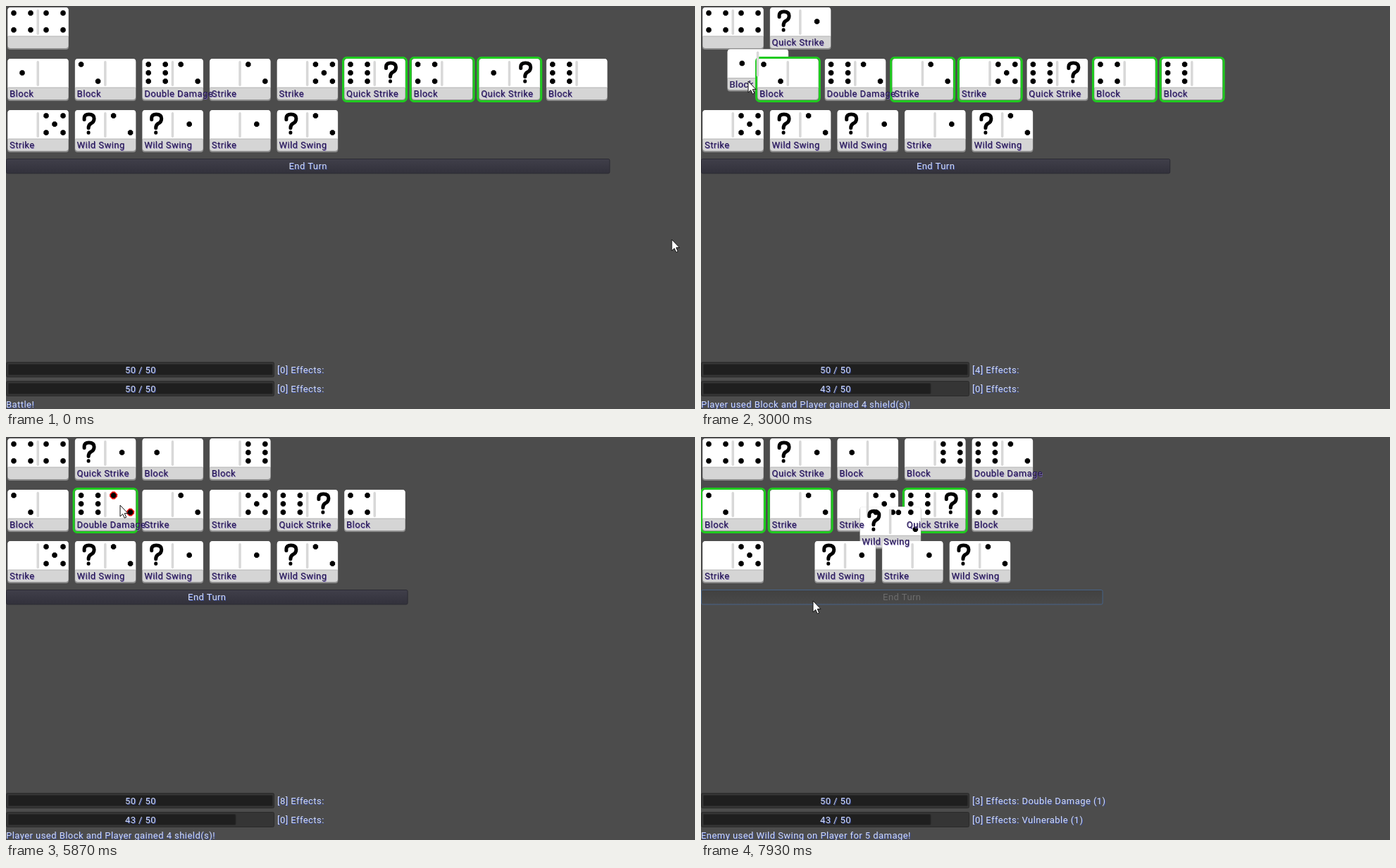
Write an HTML page that moves like this. It is 978 px wide and 573 px high and loops after 8 s.

```html
<!DOCTYPE html>
<html lang="en">
<head>
<meta charset="utf-8">
<title>Domino battle</title>
<style>
  html, body { margin: 0; width: 100%; height: 100%; overflow: hidden; background: #4c4c4c; }
  svg { display: block; width: 978px; height: 573px; cursor: none; }
  text {
    font: 13px Roboto, "Open Sans", sans-serif;
    letter-spacing: .45px;
    fill: #d3dcf4;
    text-shadow: 1px 1px 0 #3a4c9c;
    white-space: pre;
  }
  .label { fill: #24184e; text-shadow: .7px .7px 0 #7a66b4; }
  .mid { text-anchor: middle; }
  .glow { display: none; }
  .hot .glow { display: inline; }
  .ring { display: none; fill: none; stroke: #1fcb1f; stroke-width: 3; }
  .on .ring { display: inline; }
  #button rect { fill: url(#idle); stroke: #2b2a33; }
  #button.hover rect { fill: #474654; }
  #button.down rect { fill: #2a2932; stroke: #466388; }
  #button.off rect { fill: url(#dim); stroke: #466388; }
  #button.off text { fill: #6c6c6c; text-shadow: none; }
</style>
</head>
<body>
<svg id="stage" viewBox="0 0 978 573">
  <defs>
    <linearGradient id="idle" x2="0" y2="1">
      <stop stop-color="#403f4a"/><stop offset="1" stop-color="#32313b"/>
    </linearGradient>
    <linearGradient id="dim" x2="0" y2="1">
      <stop stop-color="#414141"/><stop offset="1" stop-color="#494949"/>
    </linearGradient>
  </defs>
  <g id="button">
    <rect x=".5" y="217.5" height="20.5" rx="2"/>
    <text class="mid" y="232"></text>
  </g>
  <g id="bars"></g>
  <g id="bodies"></g>
  <g id="faces"></g>
  <g id="labels"></g>
  <text id="message" x="0" y="571"></text>
  <path id="cursor" d="M0 0V16L3.7 12.6L6.2 18.2L8.7 17.1L6.3 11.6H11Z" fill="#fff" stroke="#111"/>
</svg>
<script>
const LOOP = 8000, FPS = 15, SLIDE = 450, PITCH = 95.6;
const ROW_Y = { board: 2, hand: 75, enemy: 148 };
const END_TURN = 7460, PRESS = 7260;
const $ = id => document.getElementById(id);
const clamp = v => Math.max(0, Math.min(1, v));

function add(parent, tag, attrs = {}, text) {
  const el = document.createElementNS('http://www.w3.org/2000/svg', tag);
  for (const k in attrs) el.setAttribute(k, attrs[k]);
  if (text !== undefined) el.textContent = text;
  parent.appendChild(el);
  return el;
}

// Cards: name, left value, right value, then when, where and whether flipped once played.
const deal = (row, list) => list.map(([name, a, b, at = Infinity, slot, flip], home) =>
  ({ row, home, name, a, b, at, slot, flip }));
const start = deal('board', [['', 4, 4]]);
const hand = deal('hand', [
  ['Block', 1, 0, 2917, 2], ['Block', 2, 0], ['Double Damage', 6, 2, 6053, 4],
  ['Strike', 0, 2], ['Strike', 0, 5], ['Quick Strike', 6, '?'], ['Block', 4, 0],
  ['Quick Strike', 1, '?', 1717, 1, true], ['Block', 6, 0, 4717, 3, true]
]);
const enemy = deal('enemy', [
  ['Strike', 0, 5], ['Wild Swing', '?', 2, 7783, 5], ['Wild Swing', '?', 1],
  ['Strike', 0, 1], ['Wild Swing', '?', 2]
]);
const cards = [...start, ...hand, ...enemy];

// Game state from each moment on; "open" lists the playable hand cards.
const GAIN = 'Player used Block and Player gained 4 shield(s)!';
const DOUBLE = ' Double Damage (1)';
const phases = [
  { t: 0, open: [5, 6, 7], hp: 50, shield: 0, fx: '', foe: '', msg: 'Battle!' },
  { t: 1717, open: [0], hp: 43, msg: 'Player used Quick Strike on Enemy for 7 damage!' },
  { t: 2917, open: [1, 3, 4, 6, 8], shield: 4, msg: GAIN },
  { t: 4717, open: [2], shield: 8 },
  { t: 6053, open: [1, 3], fx: DOUBLE },
  { t: END_TURN, open: [1, 3, 5] },
  { t: 7783, shield: 3, foe: ' Vulnerable (1)', msg: 'Enemy used Wild Swing on Player for 5 damage!' }
];
const stateAt = t => Object.assign({}, ...phases.filter(p => p.t <= t));

const path = [
  [0, 945, 332], [133, 945, 332], [333, 653, 309], [400, 653, 309],
  [1200, 706, 111], [1267, 706, 111], [1533, 705, 102], [1900, 705, 102],
  [2533, 74, 107], [2667, 67, 107], [3133, 67, 107], [3733, 262, 119],
  [4533, 587, 106], [4900, 587, 106], [5533, 191, 110], [5867, 162, 97],
  [6200, 162, 97], [6467, 189, 139], [6867, 180, 203], [7133, 159, 233], [LOOP, 159, 233]
];
function cursorAt(t) {
  const i = path.findIndex(p => p[0] > t);
  const [t0, x0, y0] = path[i - 1], [t1, x1, y1] = path[i];
  const k = (t - t0) / (t1 - t0);
  return [x0 + (x1 - x0) * k, y0 + (y1 - y0) * k];
}

// Pips sit on a 3 x 3 grid, numbered row by row.
const PIPS = { 0: [], 1: [4], 2: [0, 8], 4: [0, 2, 6, 8], 5: [0, 2, 4, 6, 8], 6: [0, 2, 3, 5, 6, 8] };
const octagon = (x, y, r, c) =>
  `M${x - c} ${y - r}H${x + c}L${x + r} ${y - c}V${y + c}L${x + c} ${y + r}H${x - c}L${x - r} ${y + c}V${y - c}Z`;
const HOOK = 'M13.5 13.5V11Q14 6 20 6Q27.5 6 27.5 12Q27.5 17 23 19Q19.5 21 19.5 25.5M19.5 31.7V32.3';

function drawHalf(parent, value, dx) {
  const g = add(parent, 'g', { transform: `translate(${dx})` });
  if (value === '?') {
    const pen = { d: HOOK, fill: 'none', 'stroke-linecap': 'round' };
    add(g, 'path', { ...pen, class: 'glow', stroke: '#f01010', 'stroke-width': 8 });
    add(g, 'path', { ...pen, stroke: '#000', 'stroke-width': 5 });
  } else {
    for (const n of PIPS[value]) {
      const x = 9 + n % 3 * 12, y = 8 + Math.floor(n / 3) * 12;
      add(g, 'path', { d: octagon(x, y, 5.5, 1.8), fill: '#f01010', class: 'glow' });
      add(g, 'path', { d: octagon(x, y, 3.7, 1.6), fill: '#000' });
    }
  }
  return g;
}

function buildCard(c) {
  c.body = add($('bodies'), 'g');
  add(c.body, 'rect', { y: .5, width: 87, height: 59.5, rx: 4, fill: '#8c8c8c' });
  add(c.body, 'rect', { x: .5, width: 86, height: 58, rx: 4, fill: '#d5d5d5' });
  add(c.body, 'path', { d: 'M.5 41V4Q.5 0 4.5 0H82.5Q86.5 0 86.5 4V41Z', fill: '#fff' });
  add(c.body, 'path', { d: 'M1 41H86', stroke: '#b4b4b4' });
  add(c.body, 'rect', { class: 'ring', x: -1.5, y: -1.5, width: 90, height: 62, rx: 5 });
  c.face = add($('faces'), 'g');
  add(c.face, 'rect', { x: 41.5, y: 3, width: 3.5, height: 36, rx: 1.7, fill: '#d8d8d8' });
  c.left = drawHalf(c.face, c.a, 0);
  c.right = drawHalf(c.face, c.b, 46);
  c.tag = add($('labels'), 'g');
  add(c.tag, 'text', { class: 'label', x: 3, y: 54 }, c.name);
}
cards.forEach(buildCard);

function buildBar(y) {
  const bars = $('bars');
  add(bars, 'rect', { x: .5, y: y + .5, width: 380, height: 21, rx: 2, fill: '#353535', stroke: '#2a2a2a' });
  const fill = add(bars, 'rect', { x: 3.5, y: y + 3.5, height: 15, rx: 1.5, fill: '#1f1f1f', stroke: '#292929' });
  const count = add(bars, 'text', { class: 'mid', x: 191, y: y + 15.5 });
  const info = add(bars, 'text', { x: 385, y: y + 15.5 });
  return (hp, shield, fx) => {
    fill.setAttribute('width', 375 * hp / 50);
    count.textContent = `${hp} / 50`;
    info.textContent = `[${shield}] Effects:${fx}`;
  };
}
const playerBar = buildBar(506), enemyBar = buildBar(533);

const played = (c, t) => clamp((t - c.at) / SLIDE);
const rowX = (c, t) => {
  const gone = cards.filter(o => o.row === c.row && o.home < c.home)
    .reduce((sum, o) => sum + played(o, t), 0);
  return 2 + (c.home - gone) * PITCH;
};

function placeCard(c, t, open, [mx, my]) {
  const out = t >= c.at, k = played(c, t);
  let x = rowX(c, Math.min(t, c.at)), y = ROW_Y[c.row], alpha = 1;
  if (out) {
    x += (2 + c.slot * PITCH - x) * k;
    y += (ROW_Y.board - y) * k;
    alpha = Math.min(1, ((t - c.at) / 80) ** 1.4);
  }
  for (const el of [c.body, c.face, c.tag]) {
    el.setAttribute('transform', `translate(${x.toFixed(2)} ${y.toFixed(2)})`);
    el.setAttribute('opacity', alpha);
  }
  const swap = out && c.flip;
  c.left.setAttribute('transform', `translate(${swap ? 46 : 0})`);
  c.right.setAttribute('transform', `translate(${swap ? 0 : 46})`);

  const inHand = c.row === 'hand' && !out;
  c.body.classList.toggle('on', inHand && open.includes(c.home));
  const dx = mx - x;
  const over = inHand && my > 72 && my < 142 && dx > -2 && dx < 90;
  c.left.classList.toggle('hot', over && dx < 43.5);
  c.right.classList.toggle('hot', over && dx >= 43.5);
}

function placeButton(t, [mx, my]) {
  const out = list => list.filter(c => t >= c.at).length;
  const left = hand.length - out(hand);
  const columns = Math.max(left, 1 + out(cards), enemy.length - out(enemy));
  const width = columns * PITCH - 3;
  const [rect, text] = $('button').children;
  rect.setAttribute('width', width - 1);
  text.setAttribute('x', width / 2);
  text.textContent = 'End Turn';
  const over = my >= 217 && my <= 239 && mx < width;
  $('button').setAttribute('class',
    t >= END_TURN ? 'off' : t >= PRESS ? 'down' : over ? 'hover' : '');
}

function render(now) {
  const t = Math.floor((now % LOOP) * FPS / 1000 + .06) * 1000 / FPS % LOOP;
  const s = stateAt(t), mouse = cursorAt(t);
  cards.forEach(c => placeCard(c, t, s.open, mouse));
  placeButton(t, mouse);
  playerBar(50, s.shield, s.fx);
  enemyBar(s.hp, 0, s.foe);
  $('message').textContent = s.msg;
  $('cursor').setAttribute('transform', `translate(${mouse.map(Math.round)})`);
}

function tick() {
  render(performance.now());
  requestAnimationFrame(tick);
}
tick();
</script>
</body>
</html>
```
